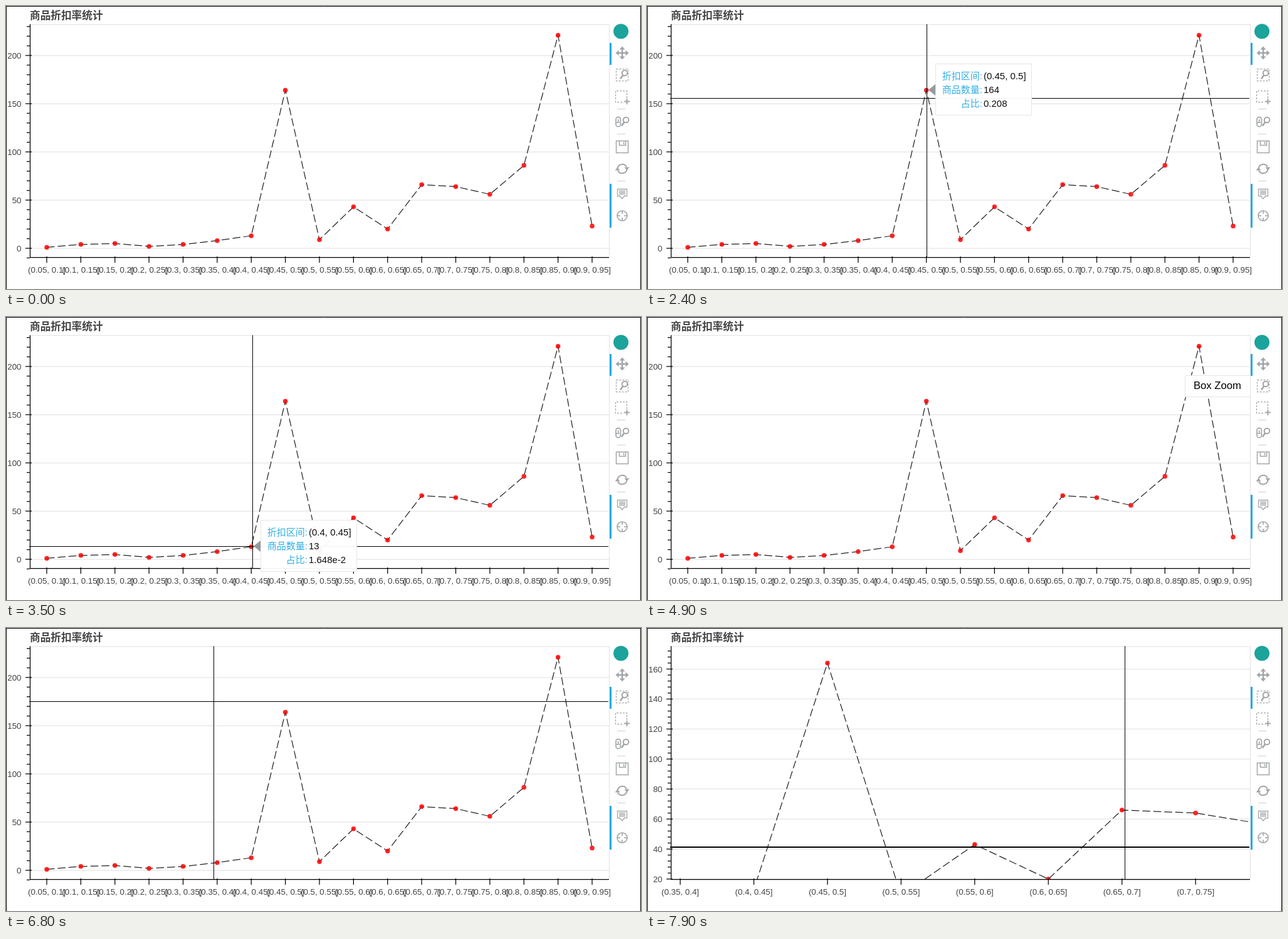
Write an HTML page with a canvas that moves like this. It is 1013 px wide and 452 px high and loops after 8000 ms.

```html
<!DOCTYPE html>
<html lang="zh-CN">
<head>
<meta charset="utf-8">
<style>
html, body { margin: 0; width: 100%; height: 100%; overflow: hidden; background: #fff; }
canvas { display: block; }
</style>
</head>
<body>
<canvas id="stage" width="1013" height="452"></canvas>
<script>
const ctx = document.getElementById('stage').getContext('2d');
const LEFT = 38, RIGHT = 962, TOP = 29, BOTTOM = 401;
const SANS = '"Liberation Sans", Arial, "Noto Sans CJK SC", "Noto Sans CJK", sans-serif';
const GREY = '#a1a6a9', BLUE = '#26aae1', PALE = '#e5e5e5';

// Discount bins are 0.05 wide; the empty bin (0.25, 0.3] is left out.
const counts = [1, 4, 5, 2, 4, 8, 13, 164, 9, 43, 20, 66, 64, 56, 86, 221, 23];
const total = counts.reduce((sum, n) => sum + n);
const bins = counts.map((_, i) => {
  const low = i < 4 ? i + 1 : i + 2;
  return `(${low * 5 / 100}, ${(low + 1) * 5 / 100}]`;
});

const makeView = (firstX, stepX, zeroY, unitY, major, minor, from) => ({
  x: i => firstX + stepX * i, y: v => zeroY - unitY * v, major, minor, from
});
const fullView = makeView(65, 54.375, 387, 1.54, 50, 10, -10);
const zoomView = makeView(-534.25, 117.45, 448.9, 2.396, 20, 4, 20);

// The pointer enters at `entry`, then makes eased moves: start, end, x, y.
const entry = { x: 506, y: 38 }, dragFrom = { x: 331, y: 117 };
const moves = [
  [100, 400, 308, 89], [900, 1500, 447, 125], [1800, 1900, 446, 147],
  [2400, 3000, 397, 366], [3100, 3200, 403, 366], [3200, 3500, 393, 366],
  [4000, 4600, 961, 110], [5700, 5900, 810, 128], [6100, 6800, 331, 117],
  [7000, 7500, 758, 356], [7800, 7900, 762, 349]
];

function pointerAt(t) {
  if (t < 100 || t >= 4600 && t < 5800) return null;
  t = Math.floor(t / 100) * 100;
  let { x, y } = entry;
  for (const [start, end, toX, toY] of moves) {
    const f = Math.min(1, Math.max(0, (t - start) / (end - start)));
    const eased = 1 - (1 - f) ** 2;
    x += (toX - x) * eased;
    y += (toY - y) * eased;
  }
  return { x: Math.round(x), y: Math.round(y) };
}

function text(str, x, y, size, color = '#444', align = 'left', weight = '') {
  ctx.font = `${weight} ${size}px ${SANS}`;
  ctx.fillStyle = color;
  ctx.textAlign = align;
  ctx.fillText(str, x, y);
}

function stroke(path, color = GREY, width = 2, dash = []) {
  ctx.strokeStyle = color;
  ctx.lineWidth = width;
  ctx.setLineDash(dash);
  ctx.stroke(new Path2D(path));
}

function fill(path, color = GREY) {
  ctx.fillStyle = color;
  ctx.fill(new Path2D(path));
}

function rect(x, y, w, h, color) {
  ctx.fillStyle = color;
  ctx.fillRect(x, y, w, h);
}

const circle = (x, y, r) => `M${x - r} ${y}a${r} ${r} 0 1 1 ${2 * r} 0a${r} ${r} 0 1 1 ${-2 * r} 0z`;

function drawAxes(view) {
  const axis = path => stroke(path, '#000', 1.25);
  axis(`M${LEFT + .5} ${TOP}V${BOTTOM + 1}M${LEFT} ${BOTTOM + .5}H${RIGHT}`);
  for (let v = view.from, y; (y = view.y(v)) > TOP; v += view.minor) {
    const isMajor = v % view.major === 0;
    axis(isMajor ? `M31 ${y}h10` : `M33 ${y}h5`);
    if (isMajor) text(v, 24.5, Math.round(y) + 5, 13.33, '#444', 'right');
  }
  bins.forEach((label, i) => {
    const x = view.x(i);
    if (x < LEFT || x > RIGHT) return;
    axis(`M${x} 400v10`);
    text(label, x, 426, 13.33, '#444', 'center');
  });
}

function drawChart(view) {
  for (let v = Math.max(0, view.from), y; (y = view.y(v)) > TOP; v += view.major) {
    stroke(`M${LEFT} ${y}H${RIGHT}`, PALE, 1.25);
  }
  stroke(`M${LEFT} ${TOP + .5}H${RIGHT + .5}V${BOTTOM}`, PALE, 1.25);

  const points = counts.map((v, i) => [view.x(i), view.y(v)]);
  ctx.save();
  ctx.beginPath();
  ctx.rect(LEFT, TOP, RIGHT - LEFT, BOTTOM - TOP + 1);
  ctx.clip();
  stroke('M' + points.map(p => p.join(' ')).join('L'), '#222', 1.25, [12.5, 5]);
  for (const [x, y] of points) fill(circle(x, y, 3.75), 'rgba(255,0,0,.85)');
  ctx.restore();
  drawAxes(view);
}

function drawHover(i) {
  const x = Math.floor(fullView.x(i)), y = Math.floor(fullView.y(counts[i]));
  const share = counts[i] / total;
  const rows = {
    '折扣区间:': bins[i],
    '商品数量:': counts[i],
    '占比:': share < .1 ? share.toExponential(3) : share.toFixed(3)
  };
  ctx.globalAlpha = .95;
  rect(x + 15, y - 42, 154, 83, '#fff');
  stroke(`M${x + 15.5} ${y - 41.5}h153v82h-153z`, PALE, 1);
  fill(`M${x + 4} ${y}l11 -9v18z`, '#909599');
  Object.entries(rows).forEach(([name, value], row) => {
    const base = y - 17 + row * 22;
    text(name, x + 90, base, 15, BLUE, 'right');
    text(value, x + 92, base, 15, '#000');
  });
  ctx.globalAlpha = 1;
}

function spin(times, paint) {
  ctx.save();
  for (let i = 0; i < times; i++) {
    paint();
    ctx.rotate(2 * Math.PI / times);
  }
  ctx.restore();
}

function lens(x, y) {
  stroke(circle(x, y, 4.3));
  stroke(`M${x - 3} ${y + 3.5}l-4 6`, GREY, 2.5);
}

// Toolbar icons, each drawn around its own centre.
const icons = {
  pan() { spin(4, () => { stroke('M0 0V-7', GREY, 2.5); fill('M0 -10.5l4.5 5h-9z'); }); },
  boxZoom() { stroke('M-9.5 -9.5h19v19h-19z', GREY, 1.25, [3, 2]); lens(4, -3); },
  boxSelect() {
    stroke('M7.5 2v-11.5h-18v18h13', GREY, 1.25, [3, 2]);
    stroke('M3 7.5h9M7.5 3v9');
  },
  wheelZoom() {
    stroke('M-10 -4a3.7 3.7 0 0 1 7.4 0v8a3.7 3.7 0 0 1 -7.4 0zM-6.3 -4v4M-9 1h5', GREY, 1.7);
    lens(6, -3);
  },
  save() { stroke('M-9.5 -9.5h19v19h-19zM-4.5 -9v6.5h10v-6.5M2.5 -8v4', GREY, 1.5); },
  reset() { spin(2, () => { stroke('M-7.5 -1a7.8 7.8 0 0 1 14.5 -2'); fill('M3.5 -2.5h8l-4 5z'); }); },
  hover() { stroke('M-7.5 -7.5h15v11h-4l-3.5 4.5l-3.5 -4.5h-4zM-5 -4.5h10M-5 -2h10M-5 .5h10', GREY, 1.3); },
  crosshair() { stroke(circle(0, 0, 8), GREY, 1.6); spin(4, () => stroke('M0 -8v5', GREY, 1.6)); }
};
const groupStarts = ['wheelZoom', 'save', 'hover'];

function drawToolbar(active) {
  fill(circle(981, 40.5, 12), '#1ba39c');
  let y = 40;
  for (const [name, paint] of Object.entries(icons)) {
    y += 35;
    if (groupStarts.includes(name)) {
      y += 5;
      rect(975, y - 21, 13, 1, '#d0d0d0');
    }
    if ([active, 'hover', 'crosshair'].includes(name)) rect(963, y - 16, 3, 35, BLUE);
    ctx.save();
    ctx.translate(983, y);
    paint();
    ctx.restore();
  }
}

function drawPointer(t, zoomed) {
  const p = pointerAt(t);
  if (!p) return;
  const dragging = t >= 7100 && !zoomed;
  if (dragging) {
    const { x, y } = dragFrom;
    rect(x, y, p.x - x, p.y - y, 'rgba(211,211,211,.5)');
    stroke(`M${x} ${y}H${p.x}V${p.y}H${x}z`, '#000', 2, [5, 5]);
  }
  rect(p.x, TOP, 1, BOTTOM - TOP, '#000');
  rect(LEFT - 1, p.y, RIGHT - LEFT, zoomed ? 2 : 1, '#000');
  if (dragging || zoomed) return;
  const near = counts.findIndex((v, i) =>
    Math.abs(fullView.x(i) - p.x) < 8 && Math.abs(fullView.y(v) - p.y) < 15);
  if (near >= 0) drawHover(near);
}

function draw(t) {
  const zoomed = t >= 7700;
  rect(0, 0, 1013, 452, '#fff');
  stroke('M.5 452V.5H1012.5V452', '#000', 1);
  text('商品折扣率统计', 38, 21, 16.67, '#444', 'left', 'bold');
  drawChart(zoomed ? zoomView : fullView);
  drawPointer(t, zoomed);
  drawToolbar(t < 5600 ? 'pan' : 'boxZoom');
  if (t >= 4900 && t < 5800) {
    rect(858, 93, 104, 35, '#fff');
    stroke('M962 93.5H858.5V127.5H962', PALE, 1);
    text('Box Zoom', 872, 115, 16.67, '#000');
  }
}

function tick(now) {
  draw(now % 8000);
  requestAnimationFrame(tick);
}
requestAnimationFrame(tick);
</script>
</body>
</html>
```
